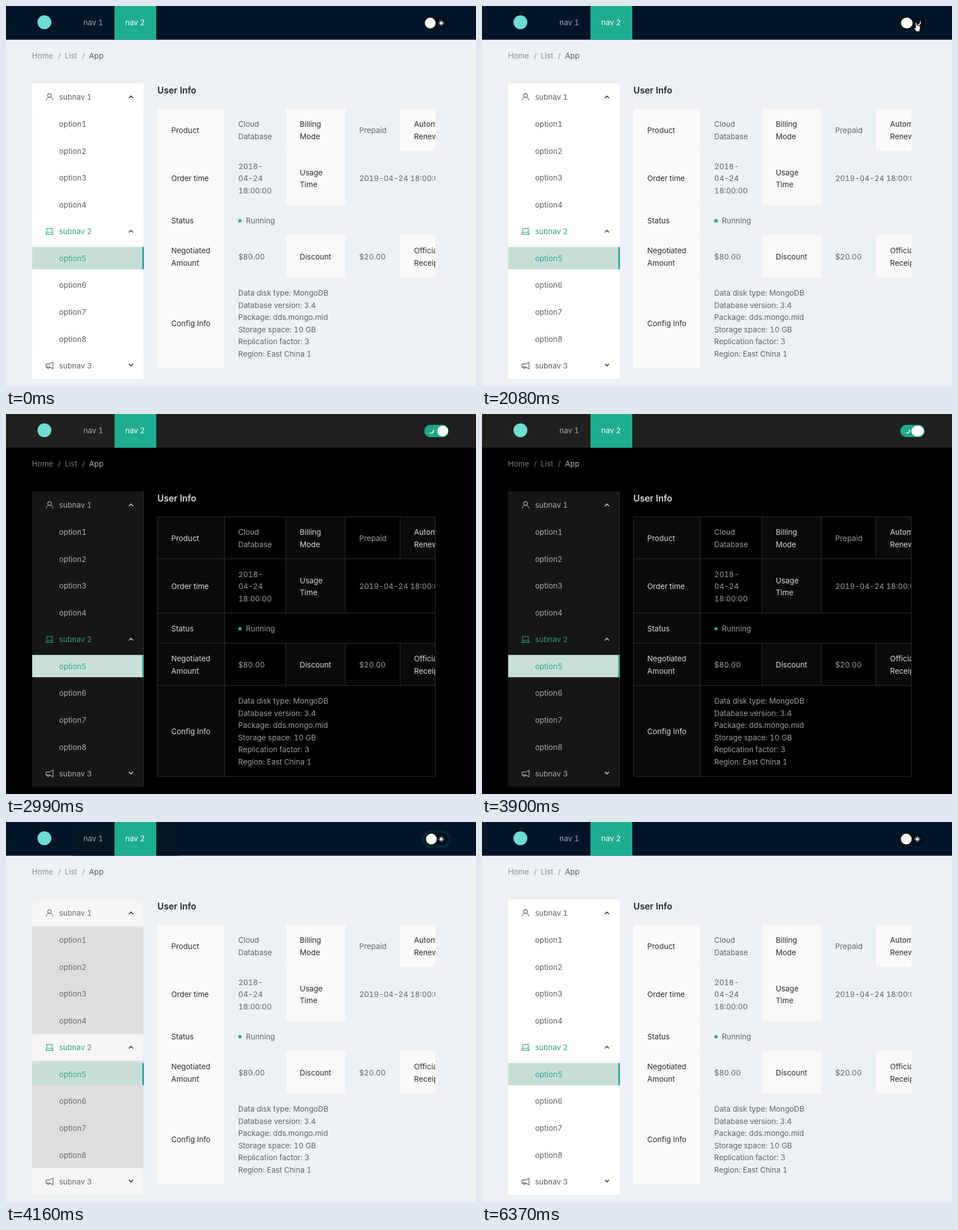
These frames come from a looping animation (832 by 673 pixels, 6.5 s). An HTML page:

```html
<!DOCTYPE html>
<html lang="en">
<head>
<meta charset="utf-8">
<title>Theme switch</title>
<style>
html, body { margin: 0; width: 100%; height: 100%; overflow: hidden; background: #eef1f4; }
svg {
  display: block; width: 832px; height: 673px;
  font: 13.35px Inter, "Open Sans", sans-serif;
  font-variant-numeric: tabular-nums;
  animation: page 6.5s step-end infinite, menu 6.5s step-end infinite;
}

/* one loop is 50 ticks of 130 ms, so 2% is one tick */
@keyframes page {
  0%, 62%, 100% {
    --bg: #eef1f4; --head: #001526; --cell: #fbfaf8; --line: transparent; --rule: #f1f1f0;
    --label: #2b2c2d; --value: #626466; --title: #212325;
    --crumb: #8c8f91; --here: #56585a; --nav: #a1a9af;
  }
  34% {
    --bg: #000; --head: #20201f; --cell: #0b0a09; --line: #30302f; --rule: #30302f;
    --label: #d9d9d6; --value: #9d9d9b; --title: #dcdcd9;
    --crumb: #7b7b79; --here: #b8b8b5; --nav: #aaaaa7;
  }
}
@keyframes menu {
  0%, 66%, 100% {
    --list: #fff; --group: #fff; --item: #5b5d5e; --sub: #5b5d5e; --arrow: #333;
    --teal: #2ea58b; --pick: #c8dfd7; --tab: transparent;
  }
  34% {
    --list: #161614; --group: #161614; --item: #acacaa; --sub: #acacaa; --arrow: #cfcfcc;
    --teal: #2a9c83; --pick: #c9e1d9; --tab: transparent;
  }
  62% {
    --list: #2c2c2a; --group: #82807e; --item: #a6a6a4; --sub: #b4b5b5; --arrow: #141414;
    --teal: #35a088; --pick: #c8e1d7; --tab: #101b20;
  }
  64% {
    --list: #dededd; --group: #f6f6f5; --item: #696a6b; --sub: #696a6b; --arrow: #2b2b2b;
    --teal: #2ea58b; --pick: #c8dfd7; --tab: #021626;
  }
}
@keyframes track {
  0%, 64%, 100% { fill: #00101e; }
  34% { fill: #1fa78c; }
  62% { fill: #06343a; }
}
@keyframes knob {
  0%, 66%, 100% { cx: 751px; rx: 9.5px; }
  32% { cx: 752px; rx: 10.3px; }
  34% { cx: 773px; rx: 9.8px; }
  36% { cx: 773px; rx: 9.5px; }
  58% { cx: 771.3px; rx: 11px; }
  62% { cx: 764px; rx: 9.8px; }
  64% { cx: 753px; rx: 9.5px; }
}
@keyframes sun {
  0%, 64%, 100% { opacity: 1; }
  32% { opacity: 0; }
}
@keyframes moon {
  0%, 62%, 100% { opacity: 0; transform: none; }
  32% { opacity: 1; transform: translateX(19px); }
  34% { opacity: 1; transform: none; }
}
@keyframes wave {
  0%, 72%, 100% { opacity: 0; }
  62% { opacity: 1; }
  64% { opacity: .75; }
  66% { opacity: .5; }
  68% { opacity: .3; }
  70% { opacity: .12; }
}
@keyframes hand {
  0%, 100% { transform: translate(0, -100px); }
  20% { transform: translate(32px, 28px); animation-timing-function: steps(3); }
  26% { transform: none; }
  40% { transform: translate(0, -100px); }
}
/* a 1.2 s pulse that restarts with the loop */
@keyframes pulse {
  0% { transform: scale(2.2); opacity: .06; }
  4.3%, 22.76%, 41.22%, 59.68%, 78.14%, 96.61% { transform: scale(2.4); opacity: 0; }
  4.31%, 22.77%, 41.23%, 59.69%, 78.15%, 96.62% { transform: scale(.8); opacity: .5; }
  100% { transform: scale(.95); opacity: .45; }
}
.track, .knob, .sun, .moon, .wave, .hand { animation: 6.5s step-end infinite; }
.track { animation-name: track; }
.knob { animation-name: knob; }
.sun { animation-name: sun; }
.moon { animation-name: moon; }
.wave { animation-name: wave; }
.hand { animation-name: hand; }
.pulse {
  transform-box: fill-box; transform-origin: center;
  animation: pulse 6.5s ease-in-out infinite;
}

.bg { fill: var(--bg); }
.head { fill: var(--head); }
.tab { fill: var(--tab); }
.list { fill: var(--list); }
.group { fill: var(--group); }
.pick { fill: var(--pick); }
.cell { fill: var(--cell); }
.label { fill: var(--label); }
.value { fill: var(--value); }
.crumb { fill: var(--crumb); }
.here { fill: var(--here); }
.nav { fill: var(--nav); }
.item { fill: var(--item); }
.sub { fill: var(--sub); }
.teal { fill: var(--teal); }
.title { fill: var(--title); font-size: 15.6px; font-weight: 600; }
.line, .rule, .arrow, .icon { fill: none; }
.line { stroke: var(--line); }
.rule { stroke: var(--rule); }
.arrow { stroke: var(--arrow); stroke-width: 1.6; }
.icon { stroke: var(--sub); stroke-width: 1.2; }
.icon.on { stroke: var(--teal); }
</style>
</head>
<body>
<svg viewBox="0 0 832 673">
  <defs>
    <clipPath id="table"><rect x="267" y="181" width="493" height="462"/></clipPath>
  </defs>
  <rect class="bg" width="832" height="673"/>

  <!-- header -->
  <rect class="head" width="832" height="59.7"/>
  <circle cx="68" cy="28.7" r="12.3" fill="#6fdccf"/>
  <path class="tab" d="M118 0h74v59.7h-74zM266 0h39v59.7h-39z"/>
  <rect x="192" width="74" height="59.7" fill="#1fad8f"/>
  <g transform="translate(0 4.8)">
    <text class="nav" x="137" y="29.5">nav 1</text>
    <text x="211" y="29.5" fill="#fff">nav 2</text>
    <text class="crumb" x="46" y="88">Home</text>
    <text class="crumb" x="92" y="88">/</text>
    <text class="crumb" x="104" y="88">List</text>
    <text class="crumb" x="134.5" y="88">/</text>
    <text class="here" x="147" y="88">App</text>
  </g>

  <!-- switch -->
  <rect class="wave" x="736" y="15" width="52" height="30.5" rx="15.2" fill="#062c33"/>
  <rect class="track" x="740.5" y="19.3" width="43" height="21.6" rx="10.8"/>
  <g class="sun">
    <circle cx="770.6" cy="30.3" r="2.7" fill="#f3efe2"/>
    <path d="M770.6 25v10.6M765.3 30.3h10.6M766.9 26.6l7.4 7.4M774.3 26.6l-7.4 7.4" stroke="#d9d6cc" stroke-width="1"/>
  </g>
  <path class="moon" d="M756.6 25.8a5.4 5.4 0 1 1-8.2 7.2a6.4 6.4 0 0 0 8.2-7.2z" fill="#f2ead2"/>
  <ellipse class="knob" cx="751" cy="30.2" rx="9.5" ry="9.6" fill="#fff"/>

  <!-- menu -->
  <rect class="list" x="46.3" y="137.3" width="197" height="523"/>
  <path class="group" d="M46.3 137.3h197v47.5h-197zM46.3 375.3h197v47.5h-197zM46.3 613h197v47.3h-197z"/>
  <path class="line" d="M243.5 137.3v523"/>
  <rect class="pick" x="46.3" y="426.7" width="197" height="39.5"/>
  <rect x="241.3" y="426.7" width="2.9" height="39.5" fill="#2fa48a"/>
  <g transform="translate(0 4.8)">
    <text class="sub" x="94" y="161.5">subnav 1</text>
    <g class="item">
      <text x="94" y="209.3">option1</text>
      <text x="94" y="257">option2</text>
      <text x="94" y="304.7">option3</text>
      <text x="94" y="352.3">option4</text>
      <text x="94" y="494.7">option6</text>
      <text x="94" y="542.3">option7</text>
      <text x="94" y="590">option8</text>
    </g>
    <text class="teal" x="94" y="399">subnav 2</text>
    <text x="94" y="447" fill="#2ea58b">option5</text>
    <text class="sub" x="94" y="636.8">subnav 3</text>
  </g>
  <path class="arrow" d="M217.6 163.2l3.6-3.7 3.6 3.7M217.6 401l3.6-3.7 3.6 3.7M217.6 633.8l3.6 3.7 3.6-3.7"/>
  <g class="icon">
    <circle cx="77" cy="158.4" r="3.3"/>
    <path d="M71.2 167.3c.4-7.4 11.2-7.4 11.6 0"/>
  </g>
  <path class="icon on" d="M72.2 393.8h9.8v7.2h-9.8zM72.2 401l-1.4 3.4h12.6l-1.4-3.4"/>
  <path class="icon" d="M83.2 631v11.6l-6.4-3.2h-5.9v-5.2h5.9zM72.4 639.4c.2 3.2 4.4 3.2 4.6 .2"/>

  <!-- description table -->
  <text class="title" x="268" y="155.4">User Info</text>
  <g clip-path="url(#table)">
    <path class="cell" d="M268 182.3h118.5v459.3h-118.5zM496 182.3h104.5v170h-104.5zM496 406.3h104.5v74.2h-104.5zM698 182.3h62v74h-62zM698 406.3h62v74.2h-62z"/>
    <path class="rule" d="M268 256.5h118.5M268 352.5h118.5M268 406h118.5M268 480.7h118.5M496 256.5h104.5"/>
    <path class="line" d="M386.5 256.5h373.5M386.5 352.5h373.5M386.5 406h373.5M386.5 480.7h373.5M386.7 182v460M495.5 182v170.5M495.5 406v74.7M600.7 182v170.5M600.7 406v74.7M697.6 182v74.5M697.6 406v74.7"/>
    <g transform="translate(0 4.8)">
      <g class="label">
        <text x="292.5" y="220">Product</text>
        <text x="292.5" y="305.7">Order time</text>
        <text x="292.5" y="380.2">Status</text>
        <text x="292.5" y="433.5">Negotiated</text>
        <text x="292.5" y="455">Amount</text>
        <text x="292.5" y="562.2">Config Info</text>
        <text x="520" y="209.3">Billing</text>
        <text x="520" y="230.8">Mode</text>
        <text x="520" y="295">Usage</text>
        <text x="520" y="316.5">Time</text>
        <text x="520" y="444.2">Discount</text>
        <text x="722.3" y="209.3">Automatic</text>
        <text x="722.3" y="230.8">Renewal</text>
        <text x="722.3" y="433.5">Official</text>
        <text x="722.3" y="455">Receipts</text>
      </g>
      <g class="value">
        <text x="411" y="209.3">Cloud</text>
        <text x="411" y="230.8">Database</text>
        <text x="625.3" y="220">Prepaid</text>
        <text x="411.3" y="284.2">2018-</text>
        <text x="411.3" y="305.7">04-24</text>
        <text x="411.3" y="327.2">18:00:00</text>
        <text x="625.3" y="305.7">2019-04-24 18:00:00</text>
        <text x="424.7" y="380.2">Running</text>
        <text x="411.3" y="444.2">$80.00</text>
        <text x="625.3" y="444.2">$20.00</text>
        <text x="411" y="508.3">Data disk type: MongoDB</text>
        <text x="411" y="529.9">Database version: 3.4</text>
        <text x="411" y="551.4">Package: dds.mongo.mid</text>
        <text x="411" y="573">Storage space: 10 GB</text>
        <text x="411" y="594.5">Replication factor: 3</text>
        <text x="411" y="616.1">Region: East China 1</text>
      </g>
    </g>
    <circle cx="414.2" cy="380.3" r="2.9" fill="#22a88c"/>
    <circle class="pulse" cx="414.2" cy="380.3" r="2.5" fill="none" stroke="#22a88c"/>
  </g>
  <rect class="line" x="268" y="182" width="492" height="460" rx="2"/>

  <!-- pointer -->
  <path class="hand" d="M767.1 30.6c.2-1.5 2.1-1.4 2.3 0l.7 4.2c.5-.9 2-.8 2.2 .3c.7-.7 1.9-.4 2 .6c.8-.5 1.7 0 1.6 1l-.5 4.8-1.3 3.7h-5.2l-3.6-5c-.9-1.3 .6-2.4 1.6-1.4l1 1z" fill="#fff" stroke="#111" stroke-width=".9" stroke-linejoin="round"/>
</svg>
</body>
</html>
```
